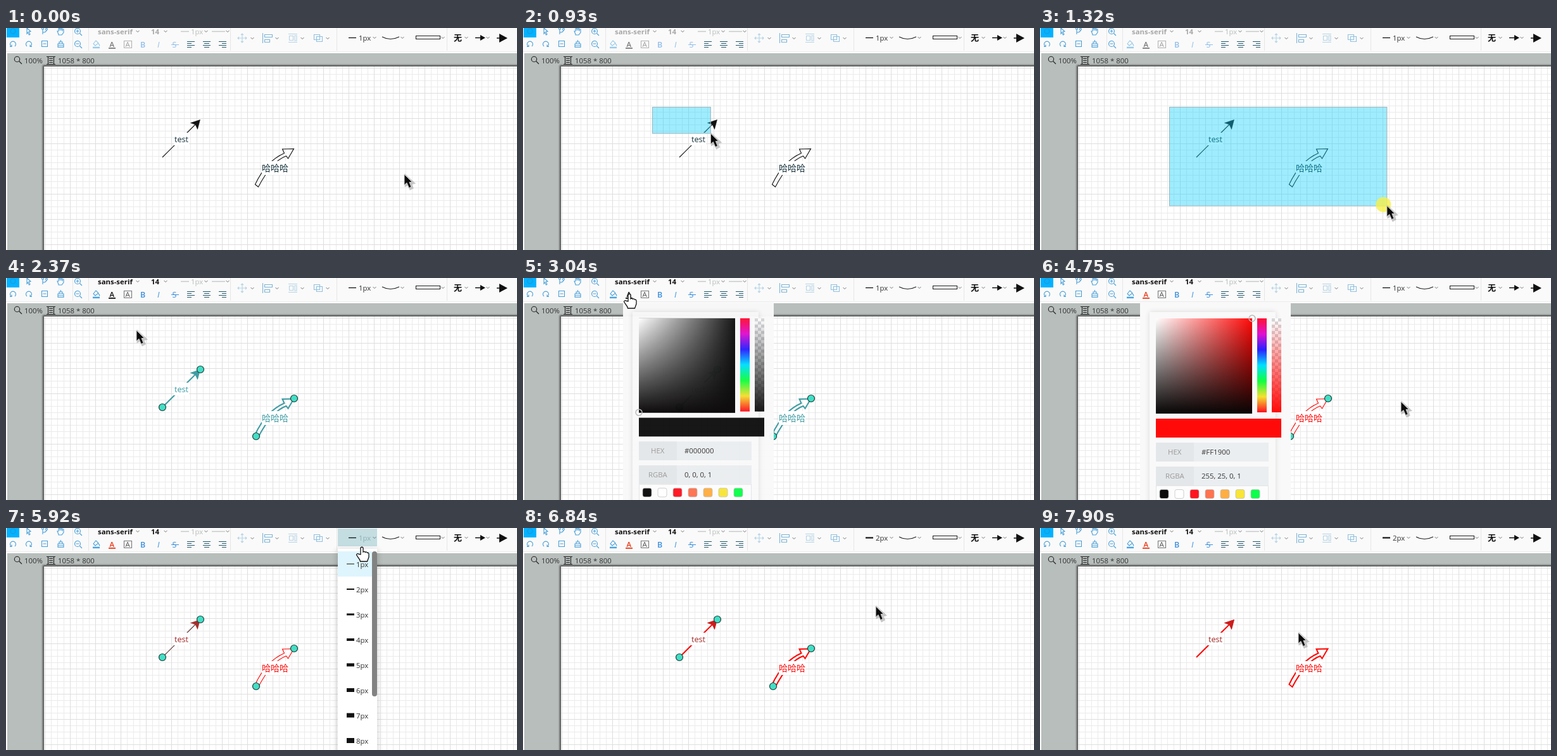
Recreate the animation shown at these times as an HTML page. Size 807 px wide and 352 px high, loop 8000 ms.

```html
<!DOCTYPE html>
<html lang="zh">
<head>
<meta charset="utf-8">
<title>Diagram editor</title>
<style>
html, body { margin: 0; width: 100%; height: 100%; overflow: hidden; background: #fff; }
svg { display: block; width: 807px; height: 352px; }
text { font: 11.4px "Open Sans", "Noto Sans", sans-serif; fill: #333; white-space: pre; }
.bold { font-weight: 700; fill: #111; }
.cjk { font: 14px "Noto Sans CJK SC", "Noto Sans CJK", sans-serif; }
.icon { fill: none; stroke: #4a9fd8; stroke-width: 1.1; }
.pale { fill: none; stroke: #b5d3e5; stroke-width: 1.1; }
.dark { fill: none; stroke: #222; stroke-width: 1.1; }
.label { fill: #999; }
</style>
</head>
<body>
<svg viewBox="0 0 807 352" xmlns="http://www.w3.org/2000/svg">
  <defs>
    <pattern id="grid" x="61" y="63" width="40" height="40" patternUnits="userSpaceOnUse">
      <path d="M10.5 0V40M20.5 0V40M30.5 0V40M0 10.5H40M0 20.5H40M0 30.5H40" stroke="#ebebeb"/>
      <path d="M.5 0V40M0 .5H40" stroke="#dedede"/>
    </pattern>
    <pattern id="checks" x="366" y="64" width="10" height="10" patternUnits="userSpaceOnUse">
      <rect width="10" height="10" fill="#fff"/>
      <path d="M0 0h5v10h5V5H0z" fill="#d5d7da"/>
    </pattern>
    <linearGradient id="white"><stop stop-color="#fff"/><stop offset="1" stop-color="#fff" stop-opacity="0"/></linearGradient>
    <linearGradient id="black" x2="0" y2="1"><stop stop-color="#000" stop-opacity="0"/><stop offset="1" stop-color="#080606"/></linearGradient>
    <linearGradient id="hue" x2="0" y2="1"></linearGradient>
    <linearGradient id="alpha" x2="0" y2="1"><stop class="picked" stop-opacity="0"/><stop class="picked" offset="1"/></linearGradient>
    <filter id="soft" x="-20%" y="-20%" width="140%" height="140%"><feGaussianBlur stdDeviation="4"/></filter>
    <filter id="edge" x="-5%" y="-5%" width="110%" height="110%"><feGaussianBlur stdDeviation="1.5"/></filter>
  </defs>

  <rect width="807" height="352" fill="#fff"/>
  <rect x="2" y="40" width="805" height="312" fill="#b7bebb"/>
  <rect x="58" y="59" width="760" height="310" fill="#444" filter="url(#edge)"/>
  <rect x="60" y="61" width="747" height="291" fill="#fff"/>
  <rect x="60" y="61" width="747" height="291" fill="url(#grid)"/>
  <g class="dark">
    <circle cx="17.5" cy="49.5" r="4.2"/><path d="M20.5 52.5L25 57"/>
    <path d="M64 45.5H78M64 57.5H78M66.5 45V58M75.5 45V58M68 48.5H74M68 51.5H74M68 54.5H74"/>
  </g>
  <text x="29" y="56">100%</text><text x="82" y="56">1058 * 800</text>

  <path id="line" fill="none" d="M247 205L299 153"/>
  <path id="head" d="M306.5 145.5L291.5 150.5L299 153L302.5 160.5Z"/>
  <path id="block" fill="none" d="M398.5 252L393.5 248Q411 211 439.5 198.5L436.5 192L454.5 191.5L445.5 207L442.5 203Q420 211 398.5 252Z"/>
  <g id="nodes" fill="#42dfc6" stroke="#1f3d3a" stroke-width="1.2"></g>
  <rect x="265" y="166" width="24" height="20" fill="#fff"/>
  <rect x="404" y="211" width="42" height="22" fill="#fff"/>
  <text id="latin" x="266" y="181" style="font-size:12.6px">test</text>
  <text id="han" class="cjk" x="404" y="227">哈哈哈</text>
  <rect id="marquee" x="204.5" y="125.5" fill="rgba(13,207,250,.4)" stroke="#9db3bd"/>

  <rect width="807" height="37" fill="#fafafa"/>
  <path d="M0 37.5H807" stroke="#ececec"/>
  <path d="M105.5 0V36M130.5 0V36M354.5 0V36M522.5 0V36M696.5 0V36" stroke="#e6e6e6"/>
  <rect x="1" width="20" height="15" fill="#00b2ff"/>
  <circle cx="11" cy="5" r="4" fill="none" stroke="#2a92d2"/>
  <g class="icon">
    <path d="M33 0L39 5.5L36 6L38 10L36.5 11L34.5 7L33 9Z"/>
    <path d="M58 10V2M58 7Q64 7 64 3"/><circle cx="58" cy="1" r="1.5"/><circle cx="64" cy="2" r="1.5"/>
    <path d="M83 10L81 5L83 5V1Q84 0 85 1V4V0H87V4V1H89V5V2H91V7L88 11H83Z"/>
    <g id="zoom"><circle cx="113" cy="5" r="4.5"/><path d="M116.5 8.5L120 12M110.5 5H115.5"/></g>
    <path d="M113 2.5V7.5"/><use href="#zoom" y="20"/>
    <path d="M8 29a4.5 4.5 0 1 1 6 0M6 29.5H9V26.5"/>
    <path d="M33 29a4.5 4.5 0 1 1 6 0M38 26.5V29.5H41"/>
    <path d="M56.5 20.5H65.5V29.5H56.5ZM58.5 25H63.5"/>
    <path d="M82 30.5V25H91V30.5ZM82 28H91M84 25V22H89V25M86.5 19V22"/>
  </g>

  <g id="fontNames"><text class="bold" x="145" y="10">sans-serif</text><text class="bold" x="229" y="10">14</text></g>
  <g id="fontTools">
    <path class="icon" d="M138 25L142 20L146 24L141 28ZM146 25Q149 28 147 28"/>
    <path d="M137 31H148" stroke="#45a4e6" stroke-width="2.5"/>
    <text id="inkLetter" x="163.5" y="30" style="font-weight:600">A</text>
    <path id="inkBar" d="M162 32H173" stroke-width="1.8"/>
    <text x="188.5" y="30" style="fill:#555">A</text><path class="dark" stroke-opacity=".6" d="M186.5 20.5H198.5V31.5H186.5Z"/>
    <text x="212" y="31" style="fill:#3d8fdd;font-weight:600;font-size:12.5px">B</text>
    <text x="239" y="31" style="fill:#3d8fdd;font-style:italic;font-size:12.5px">I</text>
    <text x="262.5" y="31" style="fill:#3d8fdd;font-size:12.5px">S</text><path d="M261 26.5H273" stroke="#3d8fdd"/>
  </g>
  <path class="dark" style="stroke:#23586b" d="M286 21.5H298M286 24.5H293M286 27.5H298M286 30.5H293M311 21.5H323M313 24.5H321M311 27.5H323M313 30.5H321M336 21.5H348M341 24.5H348M336 27.5H348M341 30.5H348"/>
  <path d="M276 5.5H289M325 5.5H346" stroke="#c5c9c9" stroke-width="1.3"/>
  <text x="292" y="10" style="fill:#b9bebe">1px</text>
  <g class="pale">
    <path d="M366 16H380M373 9V23M368 14L366 16L368 18M378 14L380 16L378 18M371 11L373 9L375 11M371 21L373 23L375 21"/>
    <path style="stroke:#7db4d5" d="M405.5 8V24M408.5 10.5H420.5V14.5H408.5ZM408.5 18.5H416.5V22.5H408.5Z"/>
    <path d="M446 9.5H460M446 22.5H460M447.5 12.5H453.5V19.5H447.5ZM456 12V20H459V12Z"/>
    <path style="stroke:#92c1df" d="M486.5 10.5H495.5V18.5H486.5ZM490.5 13.5H499.5V21.5H490.5Z"/>
  </g>

  <rect id="widthButton" x="524" y="1" width="62" height="28" fill="#c3dde1"/>
  <path id="widthLine" d="M541 15.5H553" stroke="#111"/>
  <text id="widthText" x="557" y="20">1px</text>
  <path class="dark" d="M594 14Q607 21 621 14M647.5 12.5H685.5M647.5 17.5H685.5M647.5 12V18M685.5 12V18"/>
  <text class="cjk" x="707" y="20" style="font-size:13px;font-weight:700;fill:#111">无</text>
  <path d="M741 15.5H752M775 16H781" stroke="#111" stroke-width="1.5"/>
  <path d="M749 11L757 15.5L749 20ZM779 9L792 16L779 23Z" fill="#111"/>
  <g id="chevrons" fill="none" stroke="#777"></g>

  <g id="menu">
    <rect x="522" y="34" width="66" height="330" fill="#000" opacity=".15" filter="url(#soft)"/>
    <rect x="524" y="33" width="62" height="320" fill="#fff"/>
    <rect id="hoverRow" x="524" width="54" height="40" fill="#def5fd"/>
    <g id="rows"></g>
    <rect x="578" y="37" width="8" height="230" rx="4" fill="#828282"/>
  </g>

  <g id="picker">
    <rect x="158" y="38" width="238" height="330" fill="#f9f9f9"/>
    <rect x="173" y="54" width="199" height="320" fill="#000" opacity=".13" filter="url(#soft)"/>
    <rect x="173" y="54" width="199" height="310" fill="#f9f9fa"/>
    <rect id="base" x="183" y="64" width="152" height="151"/>
    <rect x="183" y="64" width="152" height="151" fill="url(#white)"/>
    <rect x="183" y="64" width="152" height="151" fill="url(#black)"/>
    <rect x="343" y="64" width="15" height="149" fill="url(#hue)"/>
    <rect x="366" y="64" width="15" height="149" fill="url(#checks)"/>
    <rect x="366" y="64" width="15" height="149" fill="url(#alpha)"/>
    <rect id="preview" x="183" y="223" width="198" height="30"/>
    <path d="M183 261h178v30h-178zM183 299h178v30h-178z" fill="#ebeef0"/>
    <path d="M183 261h60v30h-60zM183 299h60v30h-60z" fill="#e4e7e9"/>
    <text class="label" x="202" y="280">HEX</text><text class="label" x="198" y="318">RGBA</text>
    <text id="hex" x="255" y="280"></text><text id="rgba" x="255" y="318"></text>
    <rect x="183.5" y="329.5" width="177" height="40" fill="#fcfcfc" stroke="#e3e5e6"/>
    <g id="swatches"></g>
    <circle id="knob" r="5" fill="none" stroke="#bbb" stroke-width="1.5"/>
  </g>

  <circle id="halo" r="12" fill="#f6f04a" opacity=".8"/>
  <g id="arrow">
    <path d="M2 2V18L6 16L9.500 23.500L13 21.500L10.500 15L15 14Z" fill="#777" stroke="#777" stroke-width="3" opacity=".4"/>
    <path d="M0 0V17L4 13.500L7.500 21.500L11 20L8 12.500H12.500Z" fill="#0b0b0b" stroke="#ccc"/>
  </g>
  <path id="hand" d="M-2 12V1.5Q0 -1 2 1.5V8Q4 6.5 5.5 8.5Q7.5 7 8.5 9.5Q11 8.5 11 11.5V16Q10 19 8.5 23H-2.5Q-3 20 -6 16.5L-8.5 12.5Q-7.5 9.5-5 11.5Z" fill="#fff" stroke="#111" stroke-width="1.3"/>
</svg>

<script>
const LOOP = 8000, STEP = 7900 / 60;
const SELECT = 1440, OPEN_PICKER = 2770, PICK = 4220, CLOSE_PICKER = 4860;
const OPEN_MENU = 5650, HOVER_TWO = 6300, THICKEN = 6700, DESELECT = 7760;
const TEAL = '#3f9ca3', RED = '#ff0a08';

const $ = id => document.getElementById(id);
const set = (id, attrs) => {
  for (const name in attrs) $(id).setAttribute(name, attrs[name]);
};
const show = (id, visible) => $(id).style.display = visible ? '' : 'none';
const clamp = v => Math.max(0, Math.min(1, v));

$('hue').innerHTML = ['#ff1030', '#e010d0', '#2a20ff', '#00e0ff', '#10ff40', '#f4e030', '#ff1020']
  .map((c, i) => `<stop offset="${i / 6}" stop-color="${c}"/>`).join('');
$('nodes').innerHTML = [[247, 205], [307, 145], [395, 251], [455, 191]]
  .map(([x, y]) => `<circle cx="${x}" cy="${y}" r="5.5"/>`).join('');
$('swatches').innerHTML = ['#0c0c0c', '#fff', '#ff1420', '#ff7350', '#ffae42', '#f8e536', '#0cff4a']
  .map((c, i) => `<rect x="${189 + 24 * i}" y="335.5" width="14" height="14" rx="3" fill="${c}" stroke="#bbb" stroke-width=".7"/>`).join('');
$('rows').innerHTML = Array.from({ length: 8 }, (_, i) =>
  `<path d="M538 ${57 + 40 * i}h12" stroke="#111" stroke-width="${i + 1}"/><text x="553" y="${61.5 + 40 * i}">${i + 1}px</text>`).join('');
$('chevrons').innerHTML = [[208, 5], [252, 5], [316, 5], [350, 5], [389, 16], [428, 16], [468, 16], [508, 16],
  [582, 15], [626, 15], [690, 15], [727, 15], [761, 15]]
  .map(([x, y]) => `<path d="M${x - 2.5} ${y - 1}l2.5 2.5l2.5-2.5"/>`).join('');

// time, x, y of the pointer tip
const pointer = [
  [0, 629, 232], [263, 505, 230], [540, 300, 170], [700, 204, 125], [800, 204, 125], [1190, 500, 260],
  [1317, 548, 282], [1450, 544, 278], [2107, 352, 152], [2370, 206, 83], [2630, 168, 25], [3170, 168, 25],
  [3580, 190, 110], [4080, 244, 333], [4350, 244, 333], [4740, 570, 196], [5000, 590, 180],
  [5270, 585, 150], [5650, 562, 30], [6050, 562, 30], [6300, 562, 94], [6710, 562, 94],
  [7100, 548, 180], [7490, 555, 190], [7780, 408, 166], [8000, 408, 166]
];

function pointerAt(t) {
  const i = Math.max(1, pointer.findIndex(k => k[0] >= t));
  const [t0, x0, y0] = pointer[i - 1], [t1, x1, y1] = pointer[i];
  const p = (t - t0) / (t1 - t0);
  return [x0 + (x1 - x0) * p, y0 + (y1 - y0) * p];
}

function drawShapes(t) {
  const selected = t >= SELECT && t < DESELECT, picked = t >= PICK, thick = t >= THICKEN;
  const ink = picked ? RED : selected ? TEAL : '#111';
  const width = thick || (selected && !picked) ? 2 : 1.1;
  const headInk = !picked ? ink : thick ? '#cc1c1c' : '#a52c2a';
  set('line', { stroke: picked && !thick ? '#5c3434' : ink, 'stroke-width': width });
  set('head', { fill: headInk, stroke: headInk, 'stroke-width': width / 2 });
  set('block', { stroke: ink, 'stroke-width': width });
  $('latin').style.fill = picked ? '#a02a28' : selected ? TEAL : '#16323c';
  $('han').style.fill = picked ? RED : selected ? TEAL : '#16323c';
  show('nodes', selected);
}

function drawToolbar(t) {
  const thick = t >= THICKEN, open = t >= OPEN_MENU && t < THICKEN;
  const ink = t >= PICK ? '#e63a1a' : '#111';
  set('fontNames', { opacity: t >= SELECT ? 1 : .35 });
  set('fontTools', { opacity: t >= SELECT ? 1 : .55 });
  $('inkLetter').style.fill = ink;
  set('inkBar', { stroke: ink });
  show('widthButton', open);
  set('widthLine', { 'stroke-width': thick ? 2.2 : 1.3 });
  $('widthText').textContent = thick ? '2px' : '1px';
  $('widthText').style.fill = open ? '#93b1b5' : '#333';
  show('menu', open);
  set('hoverRow', { y: t >= HOVER_TWO ? 77 : 37 });
}

function drawPicker(t) {
  const enter = 1 - (1 - clamp((t - OPEN_PICKER + 10) / 320)) ** 2;
  const shown = enter * (1 - clamp((t - CLOSE_PICKER) / 260));
  show('picker', t >= OPEN_PICKER && shown > 0);
  set('picker', { opacity: shown, transform: `translate(0 40) scale(1 ${.7 + .3 * enter}) translate(0 -40)` });
  const picked = t >= PICK, color = picked ? RED : '#111';
  set('base', { fill: color });
  set('preview', { fill: color });
  document.querySelectorAll('.picked').forEach(s => s.setAttribute('stop-color', color));
  $('hex').textContent = picked ? '#FF1900' : '#000000';
  $('rgba').textContent = picked ? '255, 25, 0, 1' : '0, 0, 0, 1';
  set('knob', picked ? { cx: 335, cy: 64 } : { cx: 183, cy: 214.5 });
}

function drawPointer(t) {
  const [x, y] = pointerAt(t);
  const within = (a, b) => t >= a && t < b;
  const hand = within(2620, 3300) || within(4000, 4470) || within(5640, 6830);
  show('marquee', within(780, SELECT));
  set('marquee', { width: Math.max(0, x - 204.5), height: Math.max(0, y - 125.5) });
  show('halo', within(1180, SELECT));
  set('halo', { cx: x - 5.5, cy: y - 2 });
  show('hand', hand);
  show('arrow', !hand);
  for (const id of ['arrow', 'hand']) set(id, { transform: `translate(${x} ${y})` });
}

const start = performance.now();

// The picture advances in even steps.
function frame(now) {
  const elapsed = Math.max(0, now - start) % LOOP;
  const t = Math.floor((elapsed + 8) / STEP) * STEP;
  drawShapes(t);
  drawToolbar(t);
  drawPicker(t);
  drawPointer(t);
  requestAnimationFrame(frame);
}
requestAnimationFrame(frame);
</script>
</body>
</html>
```
